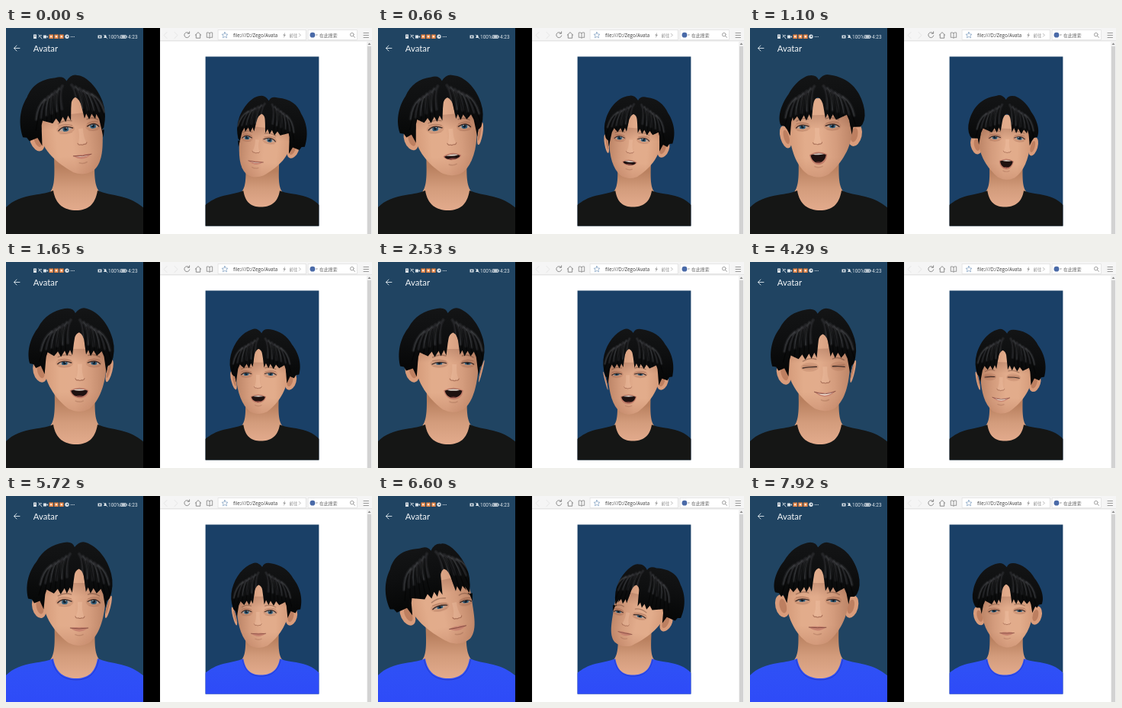
Animation, 480 px wide and 270 px high, one loop 8 s. Source, as an HTML page with a canvas:

```html
<!DOCTYPE html>
<html lang="en">
<head>
<meta charset="utf-8">
<title>Avatar mirror</title>
<style>
html, body { margin: 0; width: 100%; height: 100%; overflow: hidden; background: #fff; }
canvas { display: block; width: 480px; height: 270px; }
</style>
</head>
<body>
<canvas id="stage" width="480" height="270"></canvas>
<script>
const ctx = document.getElementById('stage').getContext('2d');
const LOOP = 8000, TICK = 110, SHIRT_CHANGE = 5280;
// Ticks on which the picture holds still.
const HOLDS = new Set([1, 17, 22, 26, 29, 32, 34, 36, 38, 40, 42, 44, 45, 47, 57, 62, 66, 68, 71]);

// time, head shift, yaw, pitch, roll, mouth opening, smile, eye opening
const POSES = [
  [0, -14, 20, -5, -.11, .12, .3, .9],
  [440, -13, 20, -5, -.11, .15, .3, .9],
  [990, 5, -6, -9, -.03, .9, .2, .75],
  [1210, 6, -8, -9, -.03, 1, .2, .75],
  [1760, -5, 12, -5, 0, .7, .5, .7],
  [2530, -6, 15, -5, 0, .85, .6, .5],
  [3080, -6, 15, -4, -.01, .6, .8, .4],
  [3740, -6, 13, -1, -.03, .08, 1, .1],
  [4730, -6, 13, 0, -.03, .04, .9, .08],
  [5390, -6, 12, 1, 0, 0, .25, .9],
  [6160, -6, 12, 1, 0, 0, .2, .9],
  [6600, -22, 27, 10, -.21, 0, .05, .55],
  [7480, -21, 27, 10, -.2, 0, .05, .55],
  [7850, -2, 1, -1, .01, 0, .1, .55]
];

function poseAt(t) {
  let i = POSES.length - 1;
  while (POSES[i][0] > t) i--;
  const a = POSES[i], b = POSES[i + 1] || a;
  let k = a === b ? 0 : (t - a[0]) / (b[0] - a[0]);
  k = k * k * (3 - 2 * k);
  const [, shift, yaw, pitch, roll, open, smile, lid] = a.map((v, n) => v + (b[n] - v) * k);
  return { shift, yaw, pitch, roll, open, smile, lid };
}

function rect(x, y, w, h, fill) {
  ctx.fillStyle = fill;
  ctx.fillRect(x, y, w, h);
}

function oval(x, y, rx, ry, fill, turn = 0) {
  ctx.beginPath();
  ctx.ellipse(x, y, rx, ry, turn, 0, Math.PI * 2);
  ctx.fillStyle = fill;
  ctx.fill();
}

function trace(d, stroke, width = 1) {
  ctx.strokeStyle = stroke;
  ctx.lineWidth = width;
  ctx.stroke(new Path2D(d));
}

function shape(d, fill) {
  ctx.fillStyle = fill;
  ctx.fill(new Path2D(d));
}

function text(s, x, y, size, fill, family = '"Open Sans", sans-serif') {
  ctx.font = `${size}px ${family}`;
  ctx.fillStyle = fill;
  ctx.fillText(s, x, y);
}

function ramp(x0, y0, x1, y1, ...colors) {
  const g = ctx.createLinearGradient(x0, y0, x1, y1);
  colors.forEach((c, i) => g.addColorStop(i / (colors.length - 1), c));
  return g;
}

function body(p, blue) {
  const top = 90 + (p.shift + p.yaw * .6) * .15;
  shape(`M${top - 27} 160 C${top - 26} 190 65 208 57 216 L57 242 H124 V216 C115 208 ${top + 26} 190 ${top + 27} 160Z`,
    ramp(0, 182, 0, 238, '#b9805f', '#d39c7c', '#e2aa8c'));
  const cloth = blue ? ramp(0, 212, 0, 270, '#2f52f5', '#2e4bf8') : '#151615';
  shape('M-2 237 C8 226 20 222 36 219 C48 217 55 216 62 213 C65 232 77 239 92 239 C107 239 117 232 120 213 C129 217 139 218 151 221 C164 224 174 230 182 237 V272 H-2Z', cloth);
  if (blue) trace('M60.5 214.5 C64 234 77 241 92 241 C107 241 118 234 121.5 214.5', 'rgba(24,38,170,.5)', 1);
}

function eye(x, y, w, lid) {
  const h = 4.2 * lid;
  if (lid > .2) {
    const d = `M${-w} 1 Q${-w * .3} ${-h * 1.7} ${w} ${-h * .2} Q${w * .3} ${h * 1.5} ${-w} 1Z`;
    ctx.save();
    ctx.translate(x, y);
    shape(d, '#b9a59b');
    ctx.clip(new Path2D(d));
    oval(0, -.2, 3.8, 4, '#2f5a75');
    oval(0, -.4, 1.9, 2, '#101c28');
    oval(1.2, -1.7, .8, .8, '#c5d8e0');
    ctx.restore();
  }
  trace(`M${x - w - .5} ${y + 1} Q${x - w * .3} ${y - h * 1.8 + .3} ${x + w + .5} ${y - h * .2}`, '#3d2a25', 1.4);
  trace(`M${x - w} ${y - h - 1.4} Q${x} ${y - h * 1.6 - 2} ${x + w} ${y - h - .6}`, 'rgba(125,72,53,.4)', .9);
  trace(`M${x - w + 1} ${y + h + 1.4} Q${x} ${y + h + 3} ${x + w - 1} ${y + h + 1}`, 'rgba(140,84,64,.25)', .8);
}

function mouth(x, y, open, smile) {
  const w = 11 + smile * 3, up = smile * 2.5;
  if (open > .2) {
    const h = 15 * open;
    shape(`M${x - w} ${y} Q${x} ${y - 7} ${x + w} ${y} C${x + w - 1} ${y + h * 1.2} ${x - w + 3} ${y + h * 1.3} ${x - w} ${y}Z`, '#c07c68');
    const hole = `M${x - w + 1.5} ${y + .5} Q${x} ${y - 4} ${x + w - 1.5} ${y + .5} C${x + w - 3} ${y + h * .95} ${x - w + 4} ${y + h * 1.05} ${x - w + 1.5} ${y + .5}Z`;
    ctx.save();
    shape(hole, '#1e1110');
    ctx.clip(new Path2D(hole));
    oval(x, y - 1.5, w - 3, 1.9, '#dccfc5');
    oval(x, y + h * .8, 6, 2, '#7a3f3a');
    ctx.restore();
  } else {
    const curve = 1 + smile * 6;
    shape(`M${x - w} ${y - up} Q${x - 4} ${y - 2.5 + up * .4} ${x} ${y - 1.5 + up * .4} Q${x + 4} ${y - 2.5 + up * .4} ${x + w} ${y - up} Q${x} ${y + 8 + smile * 3} ${x - w} ${y - up}Z`, '#c78270');
    if (smile > .6 || open > .1)
      shape(`M${x - w + 3} ${y - up + 1} Q${x} ${y + 1} ${x + w - 3} ${y - up + 1} Q${x} ${y + curve} ${x - w + 3} ${y - up + 1}Z`, '#f0dfd2');
    trace(`M${x - w} ${y - up} Q${x} ${y + curve * .55} ${x + w} ${y - up}`, '#814a3f', .9);
  }
  trace(`M${x - 5} ${y + 8 + open * 8} q5 2.5 10 0`, 'rgba(125,70,52,.25)', 1.5);
}

function ear(x, y, side, size) {
  if (size <= 0) return;
  oval(x, y, 9 * size, 15, '#d99c7b', side * .25);
  oval(x - side, y, 4.5 * size, 9.5, '#bd7f60', side * .25);
}

function hair(p, L, R) {
  const f = p.yaw, turn = Math.max(0, Math.min(f, 16));
  const out = Math.max(56, R + 2), lowL = -3 + turn * .7, lowR = 1 + turn * .5;
  const c = f * .5, top = -70 + Math.abs(p.roll) * 30;
  const px = f * .9, py = -35 + p.pitch * .5, tip = -4 + p.pitch * .7;
  const left = [[px - 6, -16], [px - 8, 0], [px - 11, -7], [px - 15, 1], [px - 18, -6], [px - 23, 2],
    [px - 27, -5], [px - 32, 1], [L + 5, -4], [L + 3, 2]];
  const right = [[R - 3, 2], [R - 6, -5], [px + 24, 1], [px + 20, -6],
    [px + 16, 1], [px + 13, -7], [px + 10, -1], [px + 8, -16]];
  const line = pts => pts.map(([x, y]) => `L${x} ${y + tip}`).join('');
  const d = `M${px + 1} ${py} Q${px - 4} ${py + 2} ${px - 5} ${py + 8} ${line(left)}
    L${L + 1} ${lowL + 13} L${L - 4} ${lowL + 2} L-47 ${lowL + 5} L-50 ${lowL} L-55 ${lowL - 1}
    C-60 -16 -52 -34 -44 -44 C-36 -59 -24 -66 ${c - 14} ${top + 1} Q${c - 3} ${top - 1} ${c} ${top + 7}
    Q${c + 7} ${top - 2} ${c + 15} ${top + 1} C36 -64 ${out - 7} -48 ${out - 2} -28
    Q${out + 2} -12 ${out - 4} ${lowR - 3} L${out - 7} ${lowR} L${R + 2} ${lowR} L${R} ${lowR + 10}
    ${line(right)} Q${px + 7} ${py + 3} ${px + 1} ${py}Z`;
  shape(d, ramp(0, -70, 0, 10, '#141516', '#0e0f10', '#060707'));
  ctx.save();
  ctx.clip(new Path2D(d));
  for (const s of [-1, 1]) {
    for (let k = 0; k < 6; k++) {
      const x = c + s * (6 + 5 * k), y = -54 + k * 3;
      const lock = `M${x} ${y} Q${x + s * (6 + k)} ${y + 8} ${c + s * (10 + 7 * k)} ${-24 + k * 2}`;
      trace(lock, 'rgba(150,156,162,.09)', 4.5);
      trace(lock, `rgba(150,156,162,${.08 + k % 2 * .1})`, 1.6);
      trace(`M${x + s * 4} ${y + 6} Q${x + s * 9} -25 ${c + s * (12 + 7 * k)} 0`, 'rgba(0,0,0,.5)', 1.4);
    }
  }
  ctx.restore();
}

function head(p) {
  const { yaw: f, pitch } = p, mid = f * .45, L = mid - 41, R = mid + 41;
  const chin = 65 + pitch * .45 + p.open * 4;
  ctx.save();
  ctx.translate(90 + p.shift, 130);
  ctx.rotate(p.roll);
  const earY = 15 + pitch * .4;
  ear(L - 5, earY, -1, Math.min(1, 1 + f / 30));
  ear(R + 4, earY, 1, Math.min(1, 1 - f / 17));
  const face = `M${L + 8} -38 Q${L} -20 ${L} 8 C${L + 2} 32 ${f - 28} ${chin - 13} ${f - 14} ${chin - 3}
    Q${f} ${chin + 4} ${f + 13} ${chin - 3} C${f + 26} ${chin - 13} ${R - 2} 32 ${R} 8 Q${R} -16 ${R - 12} -38Z`;
  shape(face, ramp(L, 0, R, 0, '#d59b7a', '#e2ac8b', '#e2ac8c', '#d49c7d', '#bd8567'));
  ctx.save();
  ctx.clip(new Path2D(face));
  rect(-70, chin - 25, 150, 32, ramp(0, chin - 25, 0, chin + 6, 'rgba(165,98,70,0)', 'rgba(165,98,70,.3)'));
  rect(-70, -16, 150, 18, ramp(0, -16, 0, 2, 'rgba(100,50,35,.2)', 'rgba(100,50,35,0)'));
  ctx.restore();

  const ey = 8 + pitch, gap = 20.5 - Math.abs(f) * .12;
  for (const s of [-1, 1]) {
    const w = 8 * (1 - s * f * .006), x = f + s * gap;
    oval(x, ey, w + 3, 6, 'rgba(150,88,66,.2)');
    trace(`M${x - w} ${ey - 9 + (s < 0 ? 1 : -1)} Q${x} ${ey - 13} ${x + w} ${ey - 9 + (s < 0 ? -1 : 1)}`, 'rgba(90,55,42,.4)', 1.5);
    ctx.save();
    ctx.translate(x, ey);
    ctx.scale(-s, 1);
    eye(0, 0, w, p.lid);
    ctx.restore();
  }

  const nx = f * 1.08, ny = 28 + pitch * .8;
  shape(`M${nx - 3} ${ny - 20} Q${nx - 2} ${ny - 6} ${nx - 6} ${ny} Q${nx} ${ny + 3} ${nx + 6} ${ny} Q${nx + 2} ${ny - 7} ${nx + 3} ${ny - 20}Z`, 'rgba(255,215,188,.22)');
  trace(`M${nx - 6} ${ny - 1} q1 3 4 2 q2 1.5 4 0 q3 1 4 -2`, 'rgba(135,76,57,.6)', 1.1);
  mouth(f, 43 + pitch * .6 - p.open * 2, p.open, p.smile);
  hair(p, L, R);
  ctx.restore();
}

function avatar(p, blue) {
  body(p, blue);
  head(p);
}

function phone(p, blue) {
  rect(0, 0, 202, 270, '#000');
  ctx.save();
  ctx.beginPath();
  ctx.rect(0, 0, 180, 270);
  ctx.clip();
  rect(0, 0, 180, 270, '#204462');
  avatar(p, blue);
  ctx.restore();

  const ink = '#dbe3e9', sans = 'Roboto, sans-serif';
  rect(36, 8.5, 4, 5.5, ink);
  rect(37, 10, 2, .7, '#345');
  trace('M43 9 l4 5 M43 12 q2 -4 4 -2', ink, .9);
  rect(49, 9.5, 4, 4, ink);
  shape('M53 11.5 l2 -1.5 v3z', ink);
  for (const x of [57, 63.8, 70.6]) {
    rect(x - .5, 8.5, 5.5, 5.5, '#e58445');
    rect(x + 1, 10, 2.4, 2.4, '#fbe4cf');
  }
  oval(80, 11.2, 2.7, 2.7, ink);
  oval(80.5, 11, .9, .9, '#35536c');
  for (const x of [84.8, 86.8, 88.8]) rect(x, 11, 1, 1, ink);
  rect(120.5, 9.5, 5, 4, ink);
  oval(123, 11.5, 1.1, 1.1, '#294a66');
  shape('M128 13 q1 -1 1 -3 q1.2 -2 2.4 0 q0 2 1 3z', ink);
  trace('M128 9 l5 5', ink, .7);
  text('100%', 134, 13.7, 6.5, ink, sans);
  trace('M150.8 9.5 h6.5 v4 h-6.5z M158.5 10.7 v1.6', ink, .8);
  rect(151.6, 10.3, 4.9, 2.4, ink);
  text('4:23', 160, 13.7, 6.5, ink, sans);
  trace('M18 26.5 H10.5 M14 23 L10.4 26.5 L14 30', '#ccd8e0', 1);
  text('Avatar', 35.8, 30.5, 11.3, '#f3f6f8', 'Lato, sans-serif');
}

function browser(p, blue) {
  rect(202, 0, 278, 270, '#fff');
  rect(202, 0, 278, 17, '#f5f5f5');
  rect(202, 16.5, 278, .8, '#d6d6d6');
  rect(278, 2, 115, 14, '#fff');
  rect(396, 2, 65, 14, '#fff');
  trace('M278.5 2.5 h115 v13 h-115z M396.5 2.5 h64 v13 h-64z', '#dcdcdc', .7);
  trace('M211 5.5 l-4 4 l4 4 M221 5.5 l4 4 l-4 4', '#e2e2e2', .9);
  const ink = '#808080';
  trace('M240 6.8 A3.5 3.5 0 1 0 240.8 10 M240.6 4.8 v2.4 h-2.5', ink, .9);
  trace('M248.2 9.3 L252 5.6 L255.8 9.3 M249.3 8.7 v4.5 h5.4 v-4.5', ink, .9);
  trace('M267 6.7 q-2 -1.4 -3.7 -.6 v6.3 q2 -.6 3.7 .6 q2 -1.3 3.7 -.6 v-6.3 q-2 -.8 -3.7 .6 v6.3', ink, .8);
  trace('M287 5.4 l1.2 2.6 2.8 .3 -2.1 1.8 .7 2.8 -2.6 -1.5 -2.6 1.5 .7 -2.8 -2.1 -1.8 2.8 -.3z', '#8aa6c6', .8);
  text('file:///D:/Zego/Avata', 298, 11.8, 6.2, '#3c3c3c');
  shape('M366 5.8 l-2.7 4 h1.6 l-.9 3.2 l3 -4.2 h-1.8z', '#999');
  const han = '"Noto Sans CJK SC", "Noto Sans CJK", sans-serif';
  text('前往', 371.5, 11.5, 5.4, '#888', han);
  trace('M384.5 7.5 l1.8 1.8 l-1.8 1.8', '#999', .7);
  oval(402, 9.2, 3.4, 3.4, '#4a6aa8');
  shape('M406.3 8.4 h2.6 l-1.3 1.6z', '#888');
  text('在此搜索', 411, 11.6, 5.9, '#666', han);
  ctx.beginPath();
  ctx.arc(453.8, 8.7, 2.3, 0, 7);
  ctx.strokeStyle = '#888';
  ctx.lineWidth = .8;
  ctx.stroke();
  trace('M455.6 10.5 l1.8 1.8', '#888', .9);
  trace('M469 6.5 h6.5 M469 9.5 h6.5 M469 12.5 h6.5', '#808080', .8);
  rect(473, 17.5, 7, 253, '#f1f1f1');
  rect(474, 24, 5, 246, '#d2d2d2');
  shape('M474.5 22 l2 -2.5 l2 2.5z', '#888');

  // The web view is a mirrored, smaller copy of the phone screen.
  ctx.save();
  ctx.beginPath();
  ctx.rect(261.6, 37.6, 148.8, 221.8);
  ctx.clip();
  rect(261, 37, 150, 223, '#1a4067');
  ctx.translate(410, 38);
  ctx.scale(-148 / 180, 148 / 180);
  avatar(p, blue);
  ctx.restore();
}

const start = performance.now();
function draw() {
  const t = (performance.now() - start) % LOOP;
  let tick = Math.floor(t / TICK);
  while (HOLDS.has(tick)) tick--;
  const p = poseAt(tick * TICK), blue = tick * TICK >= SHIRT_CHANGE;
  ctx.lineCap = 'round';
  browser(p, blue);
  phone(p, blue);
  requestAnimationFrame(draw);
}
draw();
</script>
</body>
</html>
```
